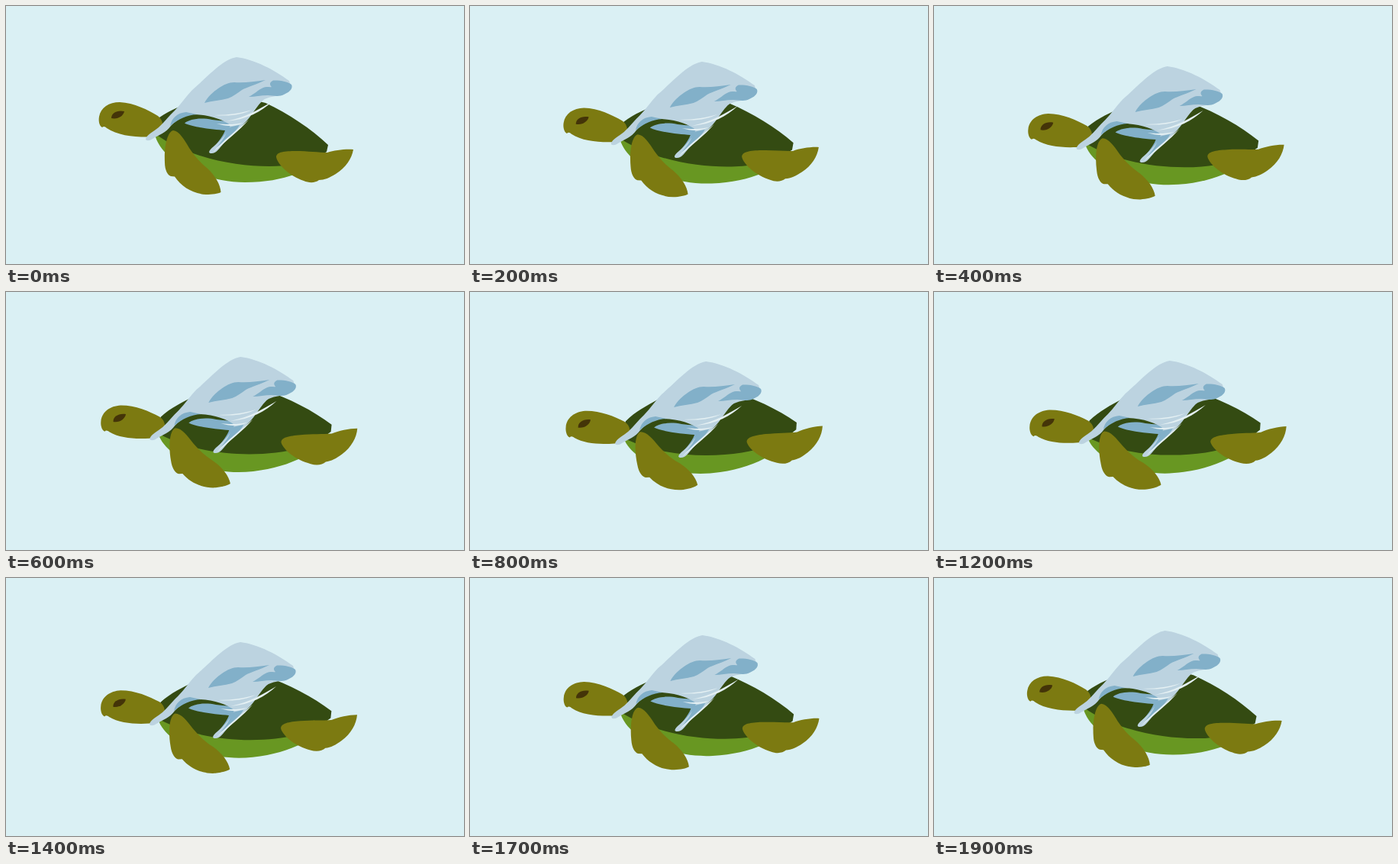
Recreate the animation shown at these times as an HTML page. Size 600x338 px, loop 2 s.

```html
<!DOCTYPE html>
<html lang="en">
<head>
<meta charset="utf-8">
<title>Turtle and plastic bag</title>
<style>
  /* --p: 0 = head up, 1 = head down; everything follows it */
  @property --p { syntax: "<number>"; inherits: true; initial-value: 0; }

  html, body { margin: 0; width: 100%; height: 100%; overflow: hidden; background: #daf0f4; }
  svg { display: block; width: 100%; height: 100%; animation: swim 2s infinite; }

  /* ten held poses each way, turning just before the middle */
  @keyframes swim {
    0%      { --p: 0;     animation-timing-function: steps(10); }
    49.999% { --p: 1.017; animation-timing-function: step-end; }
    50%     { --p: .983;  animation-timing-function: steps(10); }
    100%    { --p: -.034; }
  }

  .turn { transform: rotate(calc(var(--p) * var(--angle))); }
  .body  { --angle: -10.8deg; transform-origin: 353px 138px; }
  .front { --angle: -11.7deg; transform-origin: 343px 148px; }
  .back  { --angle: -8.1deg;  transform-origin: 350px 122px; }
  .head  { --angle: -5.6deg;  transform-origin: 525px 116px; }
  .bag   { transform: translate(calc(var(--p) * 8.7px), calc(var(--p) * 29.5px)); }

  .shell { fill: #344b12; }
  .belly { fill: #689722; }
  .skin  { fill: #7c7a11; }
  .eye   { fill: #443408; }
  .film  { fill: #bcd3e0; }
  .fold  { fill: #82b0c9; }
  .shine { fill: #e4f0f3; }
</style>
</head>
<body>
<svg viewBox="0 0 600 338" preserveAspectRatio="none">
  <g class="turn body">
    <path class="belly" d="M195 168C202 201 256 231 313 231C340 231 360 227 380 220L420 190L300 170Z"/>
    <path class="shell" d="M196 168C196 160 198 150 201 146C215 136 232 130 247 124.5C270 118 310 118 340 127C370 141 400 161 422 182L420 191C395 206 370 210 345 210C300 210 240 199 196 168Z"/>
  </g>
  <path class="turn back skin" d="M354 198C354 191 365 190 380 190C395 190 410 192 421 192C430 189 445 187 455 188C453 200 445 212 432 220C424 225 417 228 410 228C405 232 397 232 390 229C372 223 356 208 354 198Z"/>
  <path class="turn front skin" d="M219 163C211 165 207 185 208 205C208 215 212 222 216 223L221 223.5C230 237 245 246 262 247C270 247 278 246 281.5 244C281 234 274 222 263 212C253 204 246 195 240 186C233 174 227 164 219 163Z"/>
  <g class="turn head">
    <path class="skin" d="M126 159C122 157 121 150 122 145C124 133 135 126 149 126C168 127 186 136 199 144C207 150 207 160 200 167C196 171 190 171.5 184 171.5C165 171.5 145 169 132 160C130 158 128 157 126 159Z"/>
    <path class="eye" d="M138 147C138 140 146 136 155 138C154 144 146 149 138 147Z"/>
  </g>
  <g class="bag">
    <path class="fold" d="M234 153.5C241 148 255 146 270 149C282 151 292 150 304 153C300 162 288 180 272 192L266 192C274 183 284 172 287 163C272 162 245 159 234 153.5Z"/>
    <path class="film" d="M183 174C185 168 193 165 200 159C208 152 213 144 221 137C229 129 236 118 244 110C262 95 283 70 302 67C326 70 352 84 371 98L374 108L365 115C355 119 343 118 336 124C330 130 325 138 319 146C310 157 297 168 285 180C279 187 275 194 268 193C264 192 267 188 272 184C280 177 290 167 294 156C285 149 266 142 245 142C233 143 224 149 216 157C210 166 200 169 192 174C188 177 183 177 183 174Z"/>
    <path class="fold" d="M215 157C217 147 224 140 236 139L250 142C237 143 226 148 215 157Z"/>
    <path class="fold" d="M260 127C264 119 272 112 278 108C285 103 292 100 299 100C312 101 325 99 340 97C328 103 316 106 309 110C303 114 297 119 291 121C281 124 270 124 260 127Z"/>
    <path class="fold" d="M318 119C326 115 330 110 337 107C341 105 346 107 348 106C345 103 345 100 350 97.5C358 97 370 99 374 103C376 107 373 112 365 115.5C357 120 350 117 343 117C334 117 326 119 318 119Z"/>
    <path class="fold" d="M289 160C294 158 300 157 306 156C301 165 289 176 276 185C283 177 290 168 289 160Z"/>
    <path class="shine" d="M349 125C335 138 315 149 289 151C314 146 332 135 349 125ZM322 136C310 142 294 145 273 143C293 143 309 140 322 136ZM318 149C306 163 289 176 271 192C284 176 301 164 318 149ZM311 153C300 158 289 158 276 154C290 156 301 155 311 153Z"/>
  </g>
</svg>
</body>
</html>
```
